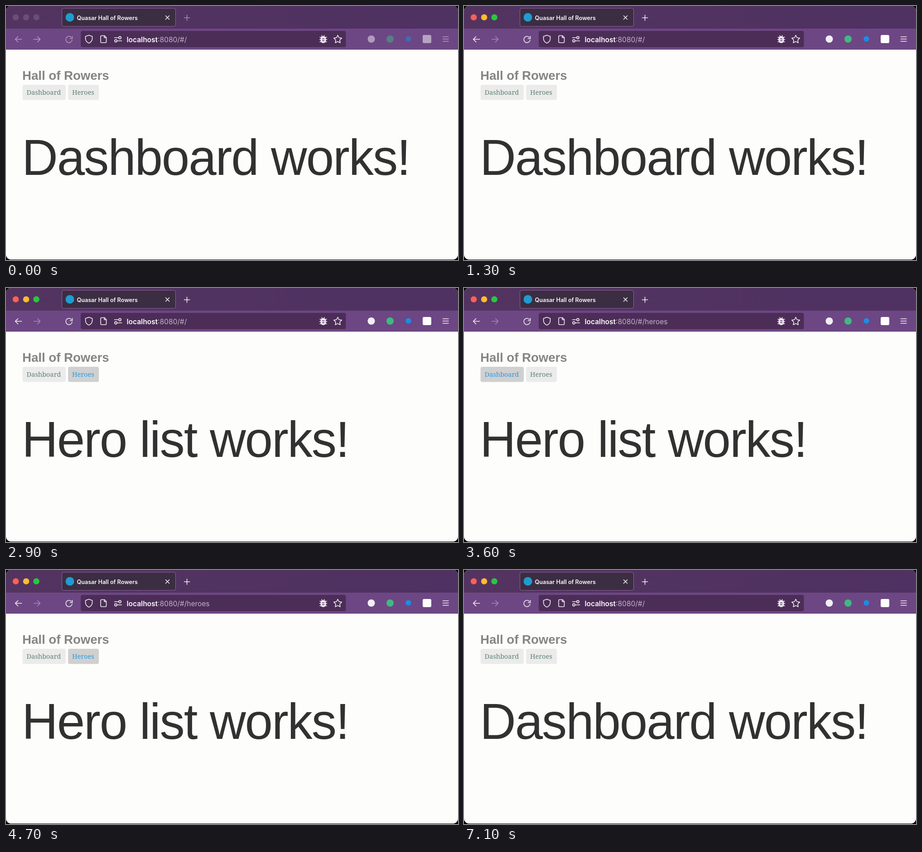
Recreate the animation shown at these times as an HTML page. Size 998x561 px, loop 7200 ms.

```html
<!DOCTYPE html>
<html lang="en">
<head>
<meta charset="utf-8">
<title>Router demo</title>
<style>
  html, body { margin: 0; width: 100%; height: 100%; overflow: hidden; background: #000; }
  svg { display: block; width: 100%; height: 100%; }
  .ui { font-family: Inter, sans-serif; }
  .page { font-family: "Liberation Sans", Arial, sans-serif; }
  .line { fill: none; stroke: #f3eef5; stroke-width: 1.6; stroke-linecap: round; stroke-linejoin: round; }
  .nav rect { fill: #ebebeb; }
  .nav text { fill: #5f8074; font: 14.5px "Noto Serif", serif; }
  .nav.hover rect { fill: #d0d0d0; }
  .nav.hover text { fill: #2d9ae0; }
  .idle .dim { opacity: .5; }
  .idle .lights circle { fill: #6b4d76; }
  #forward { opacity: .4; }
  .idle #forward { opacity: .5; }
</style>
</head>
<body>
<svg id="stage" viewBox="0 0 998 561">
  <defs>
    <linearGradient id="strip">
      <stop offset="0" stop-color="#533460"/>
      <stop offset="1" stop-color="#4f3162"/>
    </linearGradient>
    <clipPath id="window"><rect width="998" height="560" rx="11"/></clipPath>
  </defs>

  <rect width="998" height="561"/>
  <g clip-path="url(#window)">
    <rect width="998" height="561" fill="#fdfdfc"/>
    <rect width="998" height="50" fill="url(#strip)"/>
    <rect y="50" width="998" height="46" fill="#6d4784"/>
    <rect y="95" width="998" height="1" fill="#5c3d6c"/>
    <rect y="96" width="998" height="1" fill="#c8bfcc"/>

    <g class="lights">
      <circle cx="21.5" cy="25" r="6.8" fill="#ff5f57"/>
      <circle cx="44.5" cy="25" r="6.8" fill="#febc2e"/>
      <circle cx="67" cy="25" r="6.8" fill="#28c840"/>
    </g>

    <!-- Tab -->
    <rect x="123.5" y="5" width="251" height="40" rx="4" fill="#3b2d42" stroke="#93659e"/>
    <circle cx="141" cy="25" r="9.5" fill="#219bd0"/>
    <text class="ui" x="156.5" y="31" font-size="12.6" font-weight="600" fill="#fbf9fc">Quasar Hall of Rowers</text>
    <path class="line" d="M352.5 21.5l8 8m0-8l-8 8"/>
    <path class="line dim" d="M393.500 26h12m-6-6v12"/>

    <!-- Navigation -->
    <path class="line dim" d="M34.5 73.5h-14m6-6l-6 6 6 6"/>
    <path class="line" id="forward" d="M61.5 73.5h14m-6-6l6 6-6 6"/>
    <path class="line dim" d="M144.5 69.5a7 7 0 1 0 1.5 5.500M146.500 67v5h-5"/>

    <!-- Address field -->
    <rect x="165" y="55" width="585.5" height="36" rx="4" fill="#4c2d57"/>
    <g class="line">
      <path d="M183 64.5l7.500 2.800v4.700c0 5-3 8-7.500 10-4.500-2-7.500-5-7.500-10v-4.700z"/>
      <path d="M211 65.5h6.500l4 4v9.500q0 2-2 2h-8.500q-2 0-2-2v-11.500q0-2 2-2zm6 .5v4h4"/>
      <path d="M239.5 70h8m-1 7h9"/>
      <circle cx="251.5" cy="70" r="2.6"/>
      <circle cx="242.5" cy="77" r="2.6"/>
      <path d="M732.5 64.5l2.700 5.500 6 .9-4.300 4.300 1 6-5.400-2.800-5.400 2.800 1-6-4.300-4.300 6-.9z"/>
    </g>
    <text class="ui" x="266.5" y="79.5" font-size="15.5" fill="#c3b3ca"><tspan font-weight="600" fill="#fbf9fc">localhost</tspan>:8080/#/<tspan id="route"></tspan></text>
    <g>
      <path class="line" d="M693 69h15m-15.500 5h16m-15.500 5h15m-11-14l1.500 3m4.500-3l-1.500 3"/>
      <rect x="694.5" y="66.5" width="12" height="15.5" rx="6" fill="#eee8f0"/>
      <path d="M698 72.5h5m-5 4h5" stroke="#4c2d57" stroke-width="1.3"/>
    </g>

    <!-- Toolbar extensions and menu -->
    <g class="dim">
      <circle cx="806.5" cy="73" r="8" fill="#f3eef5"/>
      <circle cx="848" cy="73" r="8" fill="#41b883"/>
      <circle cx="888.5" cy="72.5" r="6" fill="#178fe5"/>
      <rect x="920" y="64" width="19" height="18" rx="3" fill="#fff"/>
      <path class="line" d="M964.5 68h12.500m-12.500 5h12.500m-12.500 5h12.500"/>
    </g>

    <!-- Page -->
    <text class="page" x="36" y="163" font-size="27.6" font-weight="700" fill="#858585">Hall of Rowers</text>
    <g class="nav" id="dashboard">
      <rect x="36.5" y="174" width="95.5" height="33.5" rx="4"/>
      <text x="45.5" y="196">Dashboard</text>
    </g>
    <g class="nav" id="heroes">
      <rect x="137" y="174" width="68" height="33.5" rx="4"/>
      <text x="146" y="196">Heroes</text>
    </g>
    <text class="page" id="heading" x="35" y="373" font-size="110.4" letter-spacing="-2.06" fill="#313131"></text>
  </g>
</svg>
<script>
  const LOOP = 7200;
  const $ = id => document.getElementById(id);

  // Each event changes part of the state from its time on.
  const events = [
    [0, { active: false, hover: "", view: "Dashboard", route: "" }],
    [1300, { active: true }],
    [2500, { hover: "heroes" }],
    [2900, { view: "Hero list" }],
    [3000, { route: "heroes" }],
    [3400, { hover: "dashboard" }],
    [3800, { view: "Dashboard", route: "" }],
    [4200, { hover: "heroes" }],
    [4700, { view: "Hero list", route: "heroes" }],
    [5200, { hover: "dashboard" }],
    [5600, { view: "Dashboard", route: "" }],
    [6000, { hover: "" }]
  ];

  function render(time) {
    const state = {};
    for (const [start, change] of events) {
      if (start <= time) Object.assign(state, change);
    }
    $("stage").classList.toggle("idle", !state.active);
    for (const id of ["dashboard", "heroes"]) {
      $(id).classList.toggle("hover", state.hover === id);
    }
    $("heading").textContent = state.view + " works!";
    $("route").textContent = state.route;
  }

  const origin = performance.now();
  function tick() {
    render((performance.now() - origin) % LOOP);
    requestAnimationFrame(tick);
  }
  tick();
</script>
</body>
</html>
```
